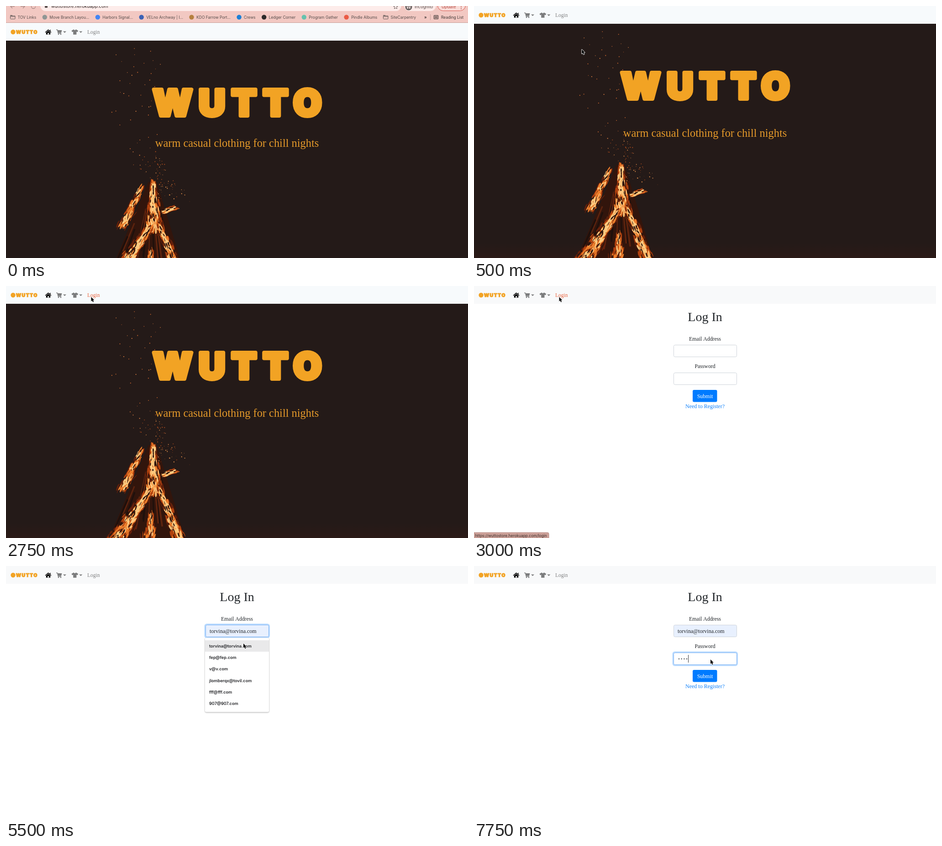
An HTML page with a canvas for the animation above (8 s loop, 1012x553 px).

```html
<!DOCTYPE html>
<html lang="en">
<head>
<meta charset="utf-8">
<title>Wutto store</title>
<style>
html, body { margin: 0; width: 100%; height: 100%; overflow: hidden; background: #fff; }
canvas { display: block; width: 1012px; height: 553px; }
</style>
</head>
<body>
<canvas id="stage" width="1012" height="553"></canvas>
<script>
const W = 1012, H = 553, NAV = 39, LOOP = 8000;
const SERIF = '"Liberation Serif", serif', SANS = 'Inter, "Liberation Sans", sans-serif';
const BRAND = 'WUTTO', AMBER = '#f2a324', INK = '#212529', GRAY = '#7b7c7d';
const SITE = 'wuttostore.herokuapp.com', EMAIL = 'torvina@torvina.com';
const EMAILS = [EMAIL, 'fep@fep.com', 'v@v.com', 'jlomberqx@tovil.com', 'fff@fff.com', '907@907.com'];
const EMBERS = ['#64200b', '#b2420f', '#ee7f2c', '#ffcb80'];
const MARKS = [
  ['TOV Links'], ['Move Branch Layou...', '#8f9694'], ['Harbors Signal...', '#4285f4'],
  ['VELno Archway | I...', '#3c62b5'], ['KDO Farrow Port...', '#b5803f'], ['Crews', '#1c7fd6'],
  ['Ledger Corner', '#2c2a2a'], ['Program Gather', '#66c2ae'], ['Pindle Albums', '#ea5b45'],
  ['SiteCarpentry']
];
const stage = document.getElementById('stage').getContext('2d');
let c = stage;

function text(str, x, y, font, color, align = 'left') {
  c.font = font;
  c.fillStyle = color;
  c.textAlign = align;
  c.fillText(str, x, y);
}

function rect(x, y, w, h, color) {
  c.fillStyle = color;
  c.fillRect(x, y, w, h);
}

function box(x, y, w, h, r, fill, stroke, line = 1) {
  c.beginPath();
  c.roundRect(x, y, w, h, r);
  if (fill) { c.fillStyle = fill; c.fill(); }
  if (stroke) { c.strokeStyle = stroke; c.lineWidth = line; c.stroke(); }
}

function disc(x, y, r, color) {
  c.beginPath();
  c.arc(x, y, r, 0, 7);
  c.fillStyle = color;
  c.fill();
}

function trace(pts) {
  c.beginPath();
  for (let i = 0; i < pts.length; i += 2) c.lineTo(pts[i], pts[i + 1]);
}

function poly(color, ...pts) {
  trace(pts);
  c.fillStyle = color;
  c.fill();
}

function line(color, width, ...pts) {
  trace(pts);
  c.strokeStyle = color;
  c.lineWidth = width;
  c.stroke();
}

function brand(x, y, size, gap, weight, align) {
  c.save();
  c.letterSpacing = gap + 'px';
  c.lineJoin = 'round';
  c.lineWidth = weight;
  c.strokeStyle = AMBER;
  text(BRAND, x, y, `900 ${size}px ${SANS}`, AMBER, align);
  c.strokeText(BRAND, x, y);
  c.restore();
}

function seeded(seed) {
  return () => (seed = (seed * 16807) % 2147483647) / 2147483647;
}

// Campfire picture, drawn once
function paintHero() {
  const sheet = document.createElement('canvas');
  sheet.width = W;
  sheet.height = H - NAV;
  c = sheet.getContext('2d');
  c.translate(0, -NAV);
  const rnd = seeded(4711);
  const spread = () => rnd() + rnd() - 1;

  const ground = c.createLinearGradient(0, 520, 0, H);
  ground.addColorStop(0, '#241a18');
  ground.addColorStop(1, '#2b1a17');
  rect(0, 0, W, H, ground);
  poly('#32150c', 312, 349, 330, 349, 392, H, 226, H);

  // Charred logs fanning out from the tip
  for (let i = 0; i < 26; i++) {
    const foot = 228 + 160 * rnd(), from = .1 + .5 * rnd(), to = from + .3;
    const at = k => [318 + (foot - 318) * k, 350 + 205 * k];
    line(i % 2 ? '#1e100c' : '#5c230e', 1 + 3 * rnd(), ...at(from), ...at(to));
  }

  // A flame: streaks scattered along a line, hotter ones nearer its middle
  const flame = (x0, y0, x1, y1, wide, n, heat) => {
    const turn = Math.atan2(y1 - y0, x1 - x0);
    const streaks = (color, count, reach, size) => {
      for (let i = 0; i < count; i++) {
        const t = rnd(), side = spread() * wide * (.3 + .7 * t) * reach;
        c.beginPath();
        c.ellipse(x0 + (x1 - x0) * t + side, y0 + (y1 - y0) * t + spread() * 5,
          (3 + 7 * rnd()) * size, (.6 + 1.6 * rnd()) * size, turn + spread() * .35, 0, 7);
        c.fillStyle = color;
        c.fill();
      }
    };
    EMBERS.forEach((color, k) => streaks(color, n * (k > 2 ? heat : 1), 1.1 - k * .13, 1.25 - k * .14));
    streaks('#2c130c', n * .3, 1.2, .7);
  };
  flame(297, 360, 256, 446, 15, 60, .5);
  flame(322, 354, 324, 458, 24, 85, 1);
  flame(313, 452, 242, 556, 28, 110, .8);
  flame(337, 446, 381, 556, 20, 90, .8);
  flame(318, 500, 312, 556, 18, 26, .4);
  flame(346, 414, 368, 407, 9, 18, .8);

  // Sparks: a sparse plume above, a dense swarm beside the tip
  for (let i = 0; i < 45; i++)
    disc(298 + spread() * 75, 54 + 260 * rnd(), .6 + .5 * rnd(), i % 3 ? '#c0632f' : '#f08a48');
  for (let i = 0; i < 85; i++) {
    const t = rnd();
    disc(322 + 46 * t + spread() * 42, 300 + 92 * t + spread() * 22, .4 + .8 * rnd(), i % 3 ? '#a84a1d' : '#f59a50');
  }
  c = stage;
  return sheet;
}

function bookmarks() {
  const font = `400 8.5px ${SANS}`, dark = '#3f3735', icon = 16.5;
  c.font = font;
  const widths = MARKS.map(([name]) => icon + c.measureText(name).width);
  const gap = (889 - widths.reduce((a, b) => a + b)) / (MARKS.length - 1);
  let x = 9;
  MARKS.forEach(([name, color], i) => {
    if (color) disc(x + 6, 24.5, 5.2, color);
    else {
      box(x + .5, 21.5, 10.5, 7, 1, null, '#5f5654');
      line('#5f5654', 1, x, 20.5, x + 5, 20.5);
      line('#5f5654', 1, x, 23.5, x + 11, 23.5);
    }
    text(name, x + icon, 27.5, font, '#554b49');
    x += widths[i] + gap;
  });
  text('»', 916, 27.5, `600 9px ${SANS}`, dark);
  rect(929, 18, 1, 13, '#c9a19c');
  box(937.5, 20.5, 9, 8, 1, null, dark, 1.2);
  for (let y = 22.7; y < 27; y += 1.8) line(dark, 1, 939, y, 945, y);
  text('Reading List', 953, 27.5, font, dark);
}

function browser() {
  const font = `400 9.2px ${SANS}`, red = '#b4443c', faded = '#a98a86';
  rect(0, 0, W, 37, '#f2c8c2');
  rect(0, 36, W, 1, '#c79d98');
  for (const [tip, way] of [[10, 1], [41, -1]]) {
    line(faded, 1.3, tip, 1, tip + 9 * way, 1);
    line(faded, 1.3, tip + 4 * way, 5, tip, 1, tip + 4 * way, -3);
  }
  c.beginPath();
  c.arc(60, 1, 4.5, 0, 3.4);
  c.stroke();

  box(75, -14, 791, 25, 12, '#fdecea');
  box(85, -1, 6, 5, 1, '#5b5150');
  text(SITE, 99, 4, `400 9.8px ${SANS}`, '#2c2625');
  const star = [];
  for (let i = 0; i <= 10; i++) {
    const a = i * Math.PI / 5, r = i % 2 ? 2.3 : 5;
    star.push(853.5 + r * Math.sin(a), 2 - r * Math.cos(a));
  }
  line('#6b605e', 1, ...star);

  box(872, -14, 70, 25, 12, '#fdecea');
  disc(882, 2, 7.5, '#6a6261');
  rect(877, .5, 10, 1, '#fdecea');
  for (const x of [879.7, 884.3]) disc(x, 4, 1.8, '#fdecea');
  text('Incognito', 895, 5, font, '#514846');
  box(945.5, -14, 61, 24.5, 12, '#f9dcd8', '#d8584f');
  text('Update', 954, 5, font, red);
  for (let y = -2; y < 7; y += 4) disc(997, y, 1, red);
  bookmarks();
}

function nav(hot, tint) {
  rect(0, 0, W, NAV, tint);
  disc(15.5, 20, 5.2, AMBER);
  brand(21.8, 24, 10.6, 1.3, 1.1, 'left');

  line('#050505', 1.6, 86, 21, 92.5, 15.4, 99, 21);
  poly('#050505', 92.5, 17.2, 97.2, 21.3, 97.2, 25.4, 87.8, 25.4, 87.8, 21.3);
  rect(91.2, 22, 2.6, 3.4, tint);
  rect(96, 15, 1.5, 3, '#050505');

  line(GRAY, 1.4, 110, 15.2, 112.4, 15.2, 114.4, 23, 121, 23);
  poly(GRAY, 112.6, 16, 122.5, 16, 121, 21.8, 113.8, 21.8);
  for (const x of [115, 120]) disc(x, 24.9, 1.3, GRAY);

  rect(147.2, 15.5, 7.2, 10.2, GRAY);
  line(GRAY, 3.6, 144.3, 18.8, 148.4, 16.4, 153.2, 16.4, 157.3, 18.8);
  disc(150.8, 14.2, 1.8, tint);

  for (const x of [125, 160.3]) poly(GRAY, x, 18.6, x + 7, 18.6, x + 3.5, 22);
  text('Login', 178, 24, `11.5px ${SERIF}`, hot ? '#e9643f' : '#808182');
}

function home(t) {
  const top = t < 500 ? 37 : 0;
  c.drawImage(hero, 0, top + NAV);
  c.save();
  c.translate(0, top);
  nav(t >= 2500, '#f7fafc');
  c.restore();
  if (top) browser();
  brand(513.5, top + 203.5, 80, 14, 8, 'center');
  text('warm casual clothing for chill nights', 506, top ? 308.5 : 286.5, `24.4px ${SERIF}`, '#e59a2a', 'center');
}

function field(y, focus, fill) {
  if (focus) box(436, y - 1, 140.5, 29, 4, null, `rgba(0,123,255,${.28 * focus})`, 3);
  box(437.5, y + .5, 138, 26, 3, fill, focus ? '#80b4f2' : '#ced4da');
}

function suggestions(hover) {
  c.save();
  c.shadowColor = 'rgba(0,0,0,.35)';
  c.shadowBlur = 3;
  c.shadowOffsetY = 1;
  box(436, 157.5, 140, 163, 3, '#fff');
  c.restore();
  if (hover) rect(436, 163, 140, 25, '#e9e9ea');
  EMAILS.forEach((name, i) => text(name, 445, 178.8 + i * 25.3, `600 9.1px ${SANS}`, '#242528'));
}

function login(t) {
  const body = `12px ${SERIF}`, label = `11.8px ${SERIF}`;
  const filled = t >= 5500;
  const mailFocus = t < 4500 || t >= 6750 ? 0 : t < 4750 ? .75 : 1;
  const passFocus = t < 6500 ? 0 : t < 6750 ? .1 : 1;
  rect(0, 0, W, H, '#fff');
  nav(t < 4000, '#f8f9fa');
  text('Log In', 506, 77, `28px ${SERIF}`, INK, 'center');
  text('Email Address', 506, 119.7, label, INK, 'center');
  text('Password', 506, 180, label, INK, 'center');
  field(129, mailFocus, filled ? '#e8f0fe' : '#fff');
  field(190, passFocus, '#fff');
  box(479, 228, 53.5, 26.5, 3, '#007bff');
  text('Submit', 506, 245.8, body, '#fff', 'center');
  text('Need to Register?', 506, 267.5, body, '#0f80fa', 'center');

  if (filled) text(EMAIL, 446, 147, body, INK);
  if (t >= 4500 && t < 6000) suggestions(filled);

  const caret = (x, y) => rect(Math.round(x), y, 1, 17, '#35383c');
  if (t >= 4500 && t < 5000) caret(446, 134);
  if (t >= 6000 && t < 6500) {
    c.font = body;
    caret(446 + c.measureText(EMAIL).width, 134);
  }
  const typed = t < 7250 ? 0 : t < 7500 ? 1 : t < 7750 ? 2 : 4;
  for (let i = 0; i < typed; i++) disc(449 + i * 5.7, 203.8, 1.1, INK);
  if (t >= 6500 && (t < 7000 || typed)) caret(446.3 + typed * 5.6, 195);

  if (t < 4500) {
    c.globalAlpha = t < 4250 ? 1 : .5;
    box(0, 541, 164, 14, [0, 3, 0, 0], '#cda199', '#b98d86');
    text(`https://${SITE}/login`, 2.5, 551, `400 8.4px ${SANS}`, '#3b2d2a');
    c.globalAlpha = 1;
  }
}

// The pointer jumps between its stops
const STOPS = [
  [250, 566, 53], [500, 236, 95], [750, 202, 36], [1000, 193, 17], [1250, 192, 19],
  [2500, 187, 27], [2750, 186.5, 24], [4000, 525, 134], [4250, 522.5, 143],
  [5500, 520, 170], [6250, 518, 205]
];

function pointer(t) {
  const stop = STOPS.findLast(s => s[0] <= t);
  if (!stop) return;
  const arrow = [0, 0, 0, 9.8, 2.2, 7.9, 3.8, 11.5, 5.6, 10.7, 4.1, 7.2, 6.8, 7, 0, 0];
  c.save();
  c.translate(stop[1], stop[2]);
  c.lineJoin = 'round';
  line('#fff', 1.6, ...arrow);
  poly('#080808', ...arrow);
  c.restore();
}

const hero = paintHero();
const start = performance.now();

function frame() {
  const t = (performance.now() - start) % LOOP;
  if (t < 3000) home(t);
  else login(t);
  pointer(t);
  requestAnimationFrame(frame);
}
frame();
</script>
</body>
</html>
```
